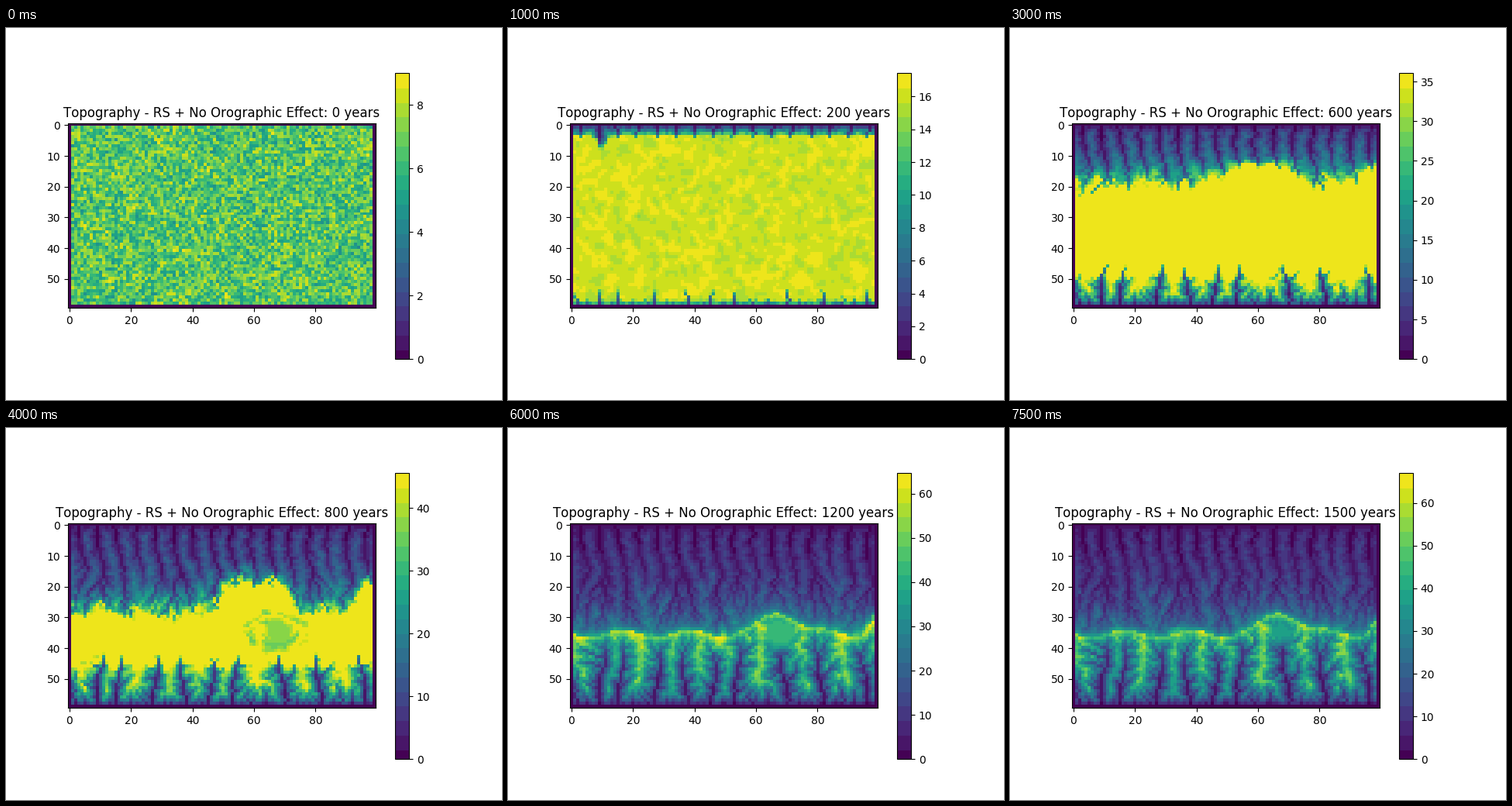
These frames come from a looping animation (640x480 px, 8 s). A matplotlib script:

```python
import numpy as np
import matplotlib.pyplot as plt
from matplotlib.animation import FuncAnimation
from matplotlib.colors import ListedColormap

H, W = 60, 100
FRAMES, YEARS_PER_FRAME = 16, 100
Y, X = np.mgrid[0:H, 0:W].astype(float)
rng = np.random.default_rng(12)

SOUTH_STREAMS = (10, 16, 28, 37, 46, 54, 69, 81, 95)
NORTH_STREAMS = np.arange(4, W, 6.2)
SUMMITS = (3, 20, 48, 88, 98)


def bell(a, center, width, power=2):
    return np.exp(-np.abs((a - center) / width) ** power)


def smooth(a):
    for axis in (0, 1):
        a = (np.roll(a, 1, axis) + 2 * a + np.roll(a, -1, axis)) / 4
    return a


def streams(centers, width):
    """Closeness to a row of gently winding valleys."""
    return np.max([bell(X, c + 1.3 * np.sin(Y / 4 + c), width) for c in centers], axis=0)


def drainage(cost):
    """Upstream area and steady height when each cell drains the cheapest way out."""
    steps = [(j, i) for j in (-1, 0, 1) for i in (-1, 0, 1) if i or j]
    cost = cost.copy()
    cost[:, [0, -1]] = 1e6
    dist = np.full((H, W), 1e9)
    dist[[0, -1]] = 0

    def options():
        return np.array([np.roll(dist, s, (0, 1)) + cost * np.hypot(*s) for s in steps])

    for _ in range(120):
        dist = np.minimum(dist, options().min(axis=0))
    way = options().argmin(axis=0)

    path = []
    for k in np.argsort(dist, axis=None):
        y, x = divmod(int(k), W)
        if 0 < y < H - 1:
            j, i = steps[way[y, x]]
            path.append(((y, x), (y - j, (x - i) % W), np.hypot(j, i)))
    area, height = np.ones((H, W)), np.zeros((H, W))
    for cell, below, _ in reversed(path):
        area[below] += area[cell]
    for cell, below, length in path:
        height[cell] = height[below] + length * area[cell] ** -0.6
    return area, height


# Drainage network on both sides of the main divide
divide = 35.5 - 7 * bell(X, 68, 8) - 6 * bell(X, 100, 4) + 1.2 * np.sin(X / 3.5)
north = Y < divide
south_bed = streams(SOUTH_STREAMS, 0.8) * (Y > 42 + 2 * np.sin(X))
north_bed = streams(NORTH_STREAMS, 0.8) * (Y < 22 + 5 * np.sin(X))
bed = np.where(north, north_bed, south_bed)
cost = np.exp(0.5 * rng.normal(size=(H, W))) * (1 - 0.8 * bed)
cost[np.abs(Y - divide) < 1.2] = 200
area, height = drainage(cost)
flow = np.clip(np.log(area) / np.log(80), 0, 1)

# Relief that erosion tends to
north_relief = 26 * height / np.quantile(height[north], 0.99) * (1 + 0.4 * (Y / divide) ** 6)
south_relief = 62 * height / np.quantile(height[~north], 0.99)
relief = np.where(north, north_relief, south_relief)
relief = (relief + smooth(relief)) / 2 * (1 - 0.35 * flow ** 2)

# Year in which erosion reaches each cell
ripple = smooth(rng.random((H, W))) - 0.5
front = 29 - 11 * bell(X, 60, 13, 4) - 10 * bell(X, 99, 8) + np.sin(X / 2.3)
north_t = np.where(Y < 8, 55 * Y, 400 + (Y - 8) / (front - 8) * 400)
north_t = np.where(Y > front, 800 + 28 * (Y - front), north_t)
north_t -= 60 * flow + 250 * bell(X, 10, 2) * bell(Y, 0, 11, 4)

d = H - 1 - Y
valley = np.clip(1.4 * smooth(flow), flow, 1) ** 1.5
slope_t, bed_t = 125 * d ** 0.75, 25 * d ** 1.22
south_t = slope_t + valley * (bed_t - slope_t)

summit = sum(bell(X, c, 5) for c in SUMMITS) * bell(Y, divide, 4.5)
uneven = 1 + 2 * smooth(ripple)
basin = (((X - 67) / 13) ** 2 + ((Y - 35) / 8) ** 2) * uneven
pond = (((X - 33.5) / 5.5) ** 2 + ((Y - 36.5) / 3.5) ** 2) * uneven
arrival = np.where(north, north_t, south_t) * (1 + 0.3 * ripple)
arrival = np.minimum(arrival, 920 + 280 * np.minimum(summit, 1))
arrival = np.clip(arrival, 0, 600 + 300 * basin)
tau = np.where(north, 75, 115)

# Roughness of the first surface
rough = rng.uniform(-1.8, 1.5, (H, W)) + 1.2 * smooth(rng.uniform(-1, 1, (H, W)))
rough_soft = 2.2 * smooth(rough - rough.mean())


def plateau(t):
    return 6.7 + 0.0472 * t


def peak(t):
    k = t / 100
    return min(4.78 * k + 7.4 + 1.61 * np.exp(-k / 1.7), 67.1 + 1.2 * (15 - k))


def terrain(t):
    top = plateau(t) + (rough if t == 0 else rough_soft * np.exp(-(t / 260) ** 2))
    basin_size = np.interp(t, [1000, 1500], [1, 0.45])
    basin_h = 37 + 7 * bell(t, 1200, 150)
    pond_h = np.interp(t, [1200, 1500], [32, 45])
    goal = np.maximum(relief, basin_h * np.exp(-(basin / basin_size) ** 2))
    goal = np.maximum(goal, pond_h * np.exp(-pond ** 2))

    age = np.maximum(t - arrival, 0)
    worn = goal + (plateau(arrival) - goal) * np.exp(-age / tau)
    z = np.where((age > 0) & (t > 0), np.minimum(worn, top), top)
    z[[0, -1]] = 0
    z[:, [0, -1]] = 0
    return z


# Twenty colour steps, the lowest one narrower
level = np.clip(np.ceil((np.linspace(0, 1, 256) - 0.031) / 0.051), 0, 19)
shades = np.where(level == 0, 0, 0.031 + 0.051 * (level - 0.5))
cmap = ListedColormap(plt.get_cmap("viridis")(shades))

plt.rcParams.update({"font.family": "DejaVu Sans", "text.kerning_factor": 6})
fig, ax = plt.subplots(figsize=(6.4, 4.8), dpi=100)
im = ax.imshow(terrain(0), cmap=cmap, vmin=0, vmax=peak(0), interpolation="nearest")
fig.colorbar(im, ax=ax)
title = ax.set_title("")


def draw(i):
    t = i * YEARS_PER_FRAME
    im.set_data(terrain(t))
    im.set_clim(0, peak(t))
    title.set_text(f"Topography - RS + No Orographic Effect: {t} years")
    return im, title


anim = FuncAnimation(fig, draw, frames=FRAMES, interval=500, repeat=True, repeat_delay=0)
plt.show()
```
